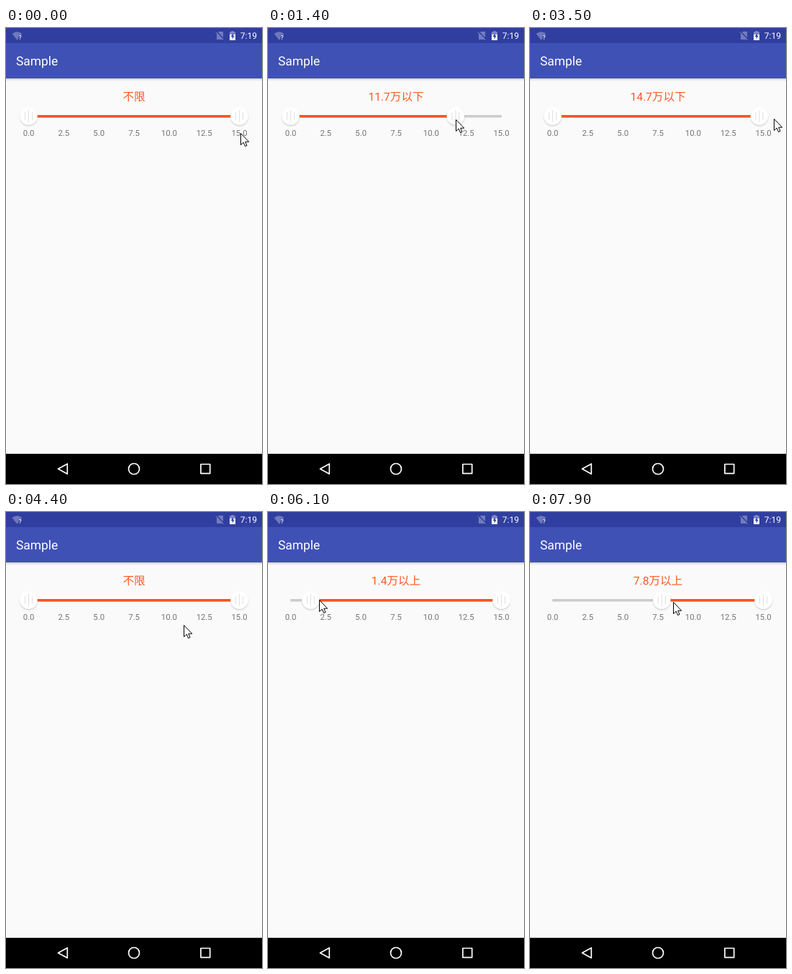
Recreate the animation shown at these times as an HTML page. Size 356 px wide and 634 px high, loop 8000 ms.

```html
<!DOCTYPE html>
<html lang="zh-CN">
<head>
<meta charset="utf-8">
<title>Range slider</title>
<style>
  html, body { margin: 0; width: 100%; height: 100%; overflow: hidden; background: #fafafa; }
  svg { display: block; position: absolute; left: 0; top: 0; }
  text { font-family: Roboto, "Noto Sans CJK SC", "Noto Sans CJK", sans-serif; text-rendering: geometricPrecision; }
  .tick { font-size: 11.3px; fill: #757575; text-anchor: middle; }
  #label { font-size: 15.6px; fill: #ff5722; text-anchor: middle; }
</style>
</head>
<body>
<svg width="356" height="634" viewBox="0 0 356 634">
  <defs>
    <linearGradient id="drop" x2="0" y2="1">
      <stop offset="0" stop-color="#000" stop-opacity=".3"/>
      <stop offset=".4" stop-color="#000" stop-opacity=".1"/>
      <stop offset="1" stop-color="#000" stop-opacity="0"/>
    </linearGradient>
    <filter id="blur" x="-30%" y="-30%" width="160%" height="160%">
      <feGaussianBlur stdDeviation="1.2"/>
    </filter>
    <g id="thumb">
      <circle cy="1.4" r="12" fill="#000" opacity=".2" filter="url(#blur)"/>
      <circle r="12.3" fill="#fff"/>
      <path d="M-5 -5.5V5.5M0 -8.500V8.500M5 -5.500V5.500" stroke="#e0e0e0"/>
    </g>
  </defs>

  <rect width="356" height="634" fill="#fafafa"/>
  <rect y="69.5" width="356" height="4.5" fill="url(#drop)"/>
  <rect width="356" height="70" fill="#3f51b5"/>
  <rect width="356" height="21" fill="#303f9f"/>
  <text x="14" y="52" font-size="17.4" fill="#fff">Sample</text>

  <!-- status icons -->
  <path d="M8.5 8Q15.500 2.500 22.500 8L21 9.500H17.500V14.500L15.500 16.800Z" fill="#fff" opacity=".3"/>
  <text x="17.6" y="16" font-size="8.500" font-weight="500" fill="#fff">?</text>
  <path d="M296 5H302V16H293V8Z" fill="#fff" opacity=".32"/>
  <path d="M292.300 5L303 16" stroke="#303f9f" stroke-width="2.400"/>
  <path d="M291.700 5.500L302.500 16.500" stroke="#fff" opacity=".4"/>
  <path d="M313.200 4.300H316.800V5.600H319V9H311V5.600H313.200Z" fill="#fff" opacity=".4"/>
  <rect x="311" y="9" width="8" height="8" fill="#fff"/>
  <path d="M316 7.300L312.600 12H314.600V15.500L317.700 10.700H316Z" fill="#303f9f"/>
  <text x="349" y="15.300" font-size="12.1" fill="#fff" text-anchor="end">7:19</text>

  <!-- navigation bar -->
  <rect y="592" width="356" height="42" fill="#000"/>
  <g fill="none" stroke="#fff" stroke-width="1.7" stroke-linejoin="round">
    <path d="M72.500 613L85.300 606V620Z"/>
    <circle cx="178" cy="613" r="7.500"/>
    <rect x="270.900" y="606.500" width="12.800" height="12.800"/>
  </g>

  <text id="label" x="178" y="101"></text>
  <g id="ticks"></g>
  <rect x="31" y="121" width="294" height="3.500" rx="1" fill="#ccc"/>
  <rect id="range" y="121" height="3.500" fill="#f9531f"/>
  <use id="low" href="#thumb"/>
  <use id="high" href="#thumb"/>
  <path id="cursor" d="M.5 .5V16.500L4.200 13.100L6.600 18.500L9 17.400L6.700 12.200H11.700Z"
        fill="#fff" stroke="#000" stroke-width="1" stroke-linejoin="round"/>
</svg>
<script>
  const LOOP = 8000, STEP = 100;
  const MIN = 31.5, MAX = 324.5, TOP = 15;
  const $ = id => document.getElementById(id);
  const clamp = (v, lo, hi) => Math.min(hi, Math.max(lo, v));

  // Pointer stops: time, x, y, sag of the way there
  const stops = [
    [0, 326, 146], [200, 326, 131], [500, 325, 130],
    [2000, 219, 125.5], [2200, 219, 125.5],
    [3100, 322, 126], [3800, 352.5, 126], [4100, 352.5, 126],
    [5000, 37, 125, 36], [5100, 33, 122], [5300, 33, 122],
    [6200, 76, 122], [7900, 199, 125]
  ];

  function pointerAt(t) {
    const i = Math.max(1, stops.findIndex(s => s[0] >= t));
    const [t0, x0, y0] = stops[i - 1], [t1, x1, y1, sag = 0] = stops[i];
    const k = (t - t0) / (t1 - t0);
    return [x0 + (x1 - x0) * k, y0 + (y1 - y0) * k + sag * Math.sin(Math.PI * k)];
  }

  // The high thumb is dragged left, then right; each drag trails the pointer
  function highAt(t, x) {
    if (t < 2200) return Math.min(MAX, x - 0.5);
    return t <= 4100 ? clamp(x - 20.5, 218.5, MAX) : MAX;
  }

  const lowAt = (t, x) => t < 5300 ? MIN : MIN + Math.max(0, x - 42.5) * 0.97;

  const amount = x => ((x - MIN) / (MAX - MIN) * TOP).toFixed(1) + "万";

  function caption(low, high) {
    if (low > MIN) return amount(low) + "以上";
    return high < MAX ? amount(high) + "以下" : "不限";
  }

  const move = (id, x, y) => $(id).setAttribute("transform", `translate(${x} ${y})`);

  function draw(ms) {
    const t = Math.floor(ms % LOOP / STEP) * STEP;
    const [x, y] = pointerAt(t);
    const low = lowAt(t, x), high = highAt(t, x);
    $("label").textContent = caption(low, high);
    $("range").setAttribute("x", low);
    $("range").setAttribute("width", high - low);
    move("low", low, 122.5);
    move("high", high, 122.5);
    move("cursor", Math.round(x), Math.round(y));
  }

  for (let i = 0; i <= 6; i++) {
    const tick = document.createElementNS("http://www.w3.org/2000/svg", "text");
    tick.setAttribute("class", "tick");
    tick.setAttribute("x", MIN + (MAX - MIN) * i / 6);
    tick.setAttribute("y", 149.5);
    tick.textContent = (i * 2.5).toFixed(1);
    $("ticks").append(tick);
  }

  const start = performance.now();
  function loop() {
    draw(performance.now() - start);
    requestAnimationFrame(loop);
  }
  loop();
</script>
</body>
</html>
```
